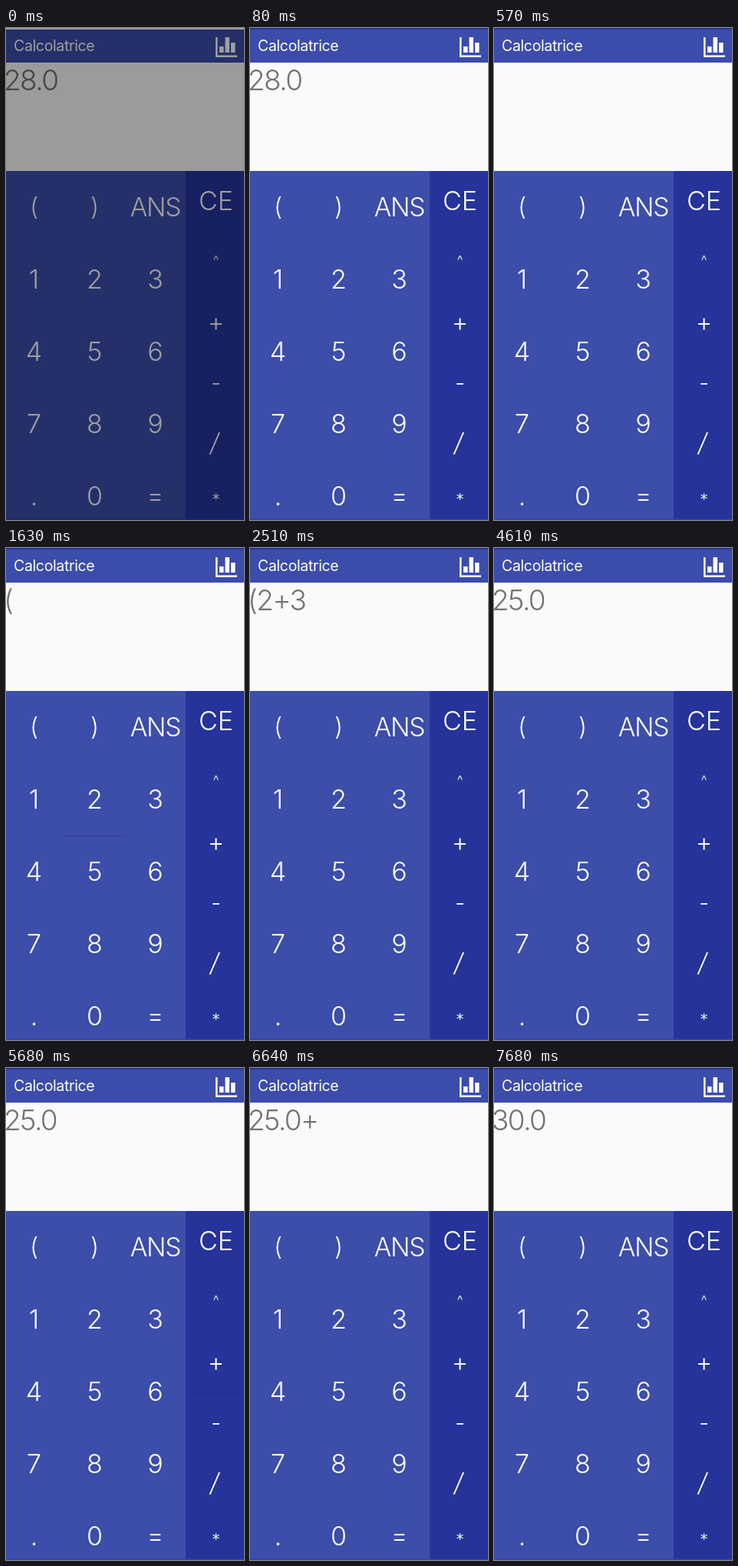
An HTML page that plays this animation: 310 px wide and 640 px high, repeating every 8.09 s.

```html
<!DOCTYPE html>
<html lang="it">
<head>
<meta charset="utf-8">
<title>Calcolatrice</title>
<style>
  html, body { margin: 0; width: 100%; height: 100%; overflow: hidden; }
  svg { display: block; width: 100%; height: 100%; }
  text { font-family: Inter, Roboto, sans-serif; font-weight: 300; white-space: pre; }
</style>
</head>
<body>
<svg id="stage" viewBox="0 0 310 640" xmlns="http://www.w3.org/2000/svg"></svg>
<script>
const LOOP = 8090;
const DIM_END = 80;
const ROW = 94, SIDE_ROW = 78.5, TOP = 186;
const svg = document.getElementById('stage');

function add(tag, attrs, content = '') {
  const el = document.createElementNS(svg.namespaceURI, tag);
  for (const name in attrs) el.setAttribute(name, attrs[name]);
  el.textContent = content;
  return svg.appendChild(el);
}
const rect = (x, y, width, height, fill) => add('rect', { x, y, width, height, fill });
const label = (str, x, y, size, extra) =>
  add('text', { x, y, 'font-size': size, fill: '#fff', ...extra }, str);
const centred = { 'text-anchor': 'middle' };

// Panels
rect(0, 0, 310, 640, '#fafafa');
rect(0, 0, 310, 45, '#3b4cab');
rect(0, 0, 310, 2, '#26349a');
rect(0, TOP, 234, 454, '#3c4daa');
rect(234, TOP, 76, 454, '#25339a');

// Header
label('Calcolatrice', 10, 30, 19.5, { 'letter-spacing': -0.35, style: 'font-weight: 400' });
for (const [x, y, w, h] of [[273, 12, 2.5, 26], [273, 35.5, 28, 2.5],
  [278, 24, 5.5, 8], [285.5, 12, 5.5, 20], [293, 19, 5.5, 13]]) rect(x, y, w, h, '#fff');

// Number pad
const columns = [36.5, 115.5, 194.5];
[...'123456789'].forEach((digit, i) =>
  label(digit, columns[i % 3], 339 + Math.floor(i / 3) * ROW, 34, centred));
label('0', columns[1], 621, 34, centred);
label('(', columns[0], 244, 32, centred);
label(')', columns[1], 244, 32, centred);
label('ANS', columns[2], 245, 33.5, { ...centred, 'letter-spacing': -1.3 });
label('.', columns[0], 621, 34, centred);
label('=', columns[2], 619.5, 33, centred);

// Operators
for (const [op, y, size] of [['CE', 237, 34], ['^', 309, 18], ['+', 393.5, 33],
  ['-', 471.5, 29], ['*', 621, 22]]) label(op, 273.5, y, size, centred);
label('/', 271.5, 551, 33, { ...centred, 'font-style': 'italic' });
rect(0, 638.5, 310, 1.5, '#34449f');

const display = label('', -3, 81, 37, { fill: '#737373', 'letter-spacing': -1.6 });
const edge = rect(0, 0, 0, 1, '#000');
const blur = rect(0, 0, 0, 2, '#000');
edge.setAttribute('opacity', 0.16);
blur.setAttribute('opacity', 0.07);
const dim = rect(0, 0, 310, 640, '#000');
dim.setAttribute('opacity', 0.38);
const dimTop = rect(0, 0, 310, 2, '#9b9b9b');

// Bottom edge of each key that gets pressed: x, y, width
const pad = (col, row) => [[0, 76, 155][col], TOP + row * ROW, [75, 79, 79][col]];
const side = row => [235, Math.floor(TOP + row * SIDE_ROW), 75];
const keys = {
  '(': pad(0, 1), ')': pad(1, 1), 2: pad(1, 2), 3: pad(2, 2), 5: pad(1, 3),
  CE: side(1), '^': side(2), '+': side(3)
};

// Time, display, pressed key, deep shadow
const steps = [
  [0, '28.0'],
  [490, '', 'CE', true], [570, ''],
  [1150, '', '('], [1390, '(', '(', true], [1470, '('],
  [1630, '(', '2'], [1870, '(2', '2', true], [1950, '(2'],
  [2190, '(2', '+'], [2270, '(2+', '+', true], [2350, '(2+', '3'],
  [2430, '(2+3', '3', true], [2510, '(2+3'],
  [2750, '(2+3', ')'], [2910, '(2+3)', ')', true], [2990, '(2+3)'],
  [3480, '(2+3)', '^'], [3800, '(2+3)^', '^', true],
  [3880, '(2+3)^', '2'], [3960, '(2+3)^2', '2', true], [4040, '(2+3)^2'],
  [4610, '25.0'],
  [5680, '25.0', '+'], [6160, '25.0+', '+'], [6640, '25.0+'],
  [6880, '25.0+', '5'], [6960, '25.0+5', '5', true], [7040, '25.0+5'],
  [7680, '30.0']
];

function place(el, [x, y, width], shown) {
  el.setAttribute('x', x);
  el.setAttribute('y', y);
  el.setAttribute('width', shown ? width : 0);
}

function draw(time) {
  const [, str, key, deep] = steps.findLast(step => step[0] <= time);
  display.textContent = str;
  const [x, y, w] = keys[key] || [0, 0, 0];
  place(edge, [x, y, w], key);
  place(blur, [x, y + 1, w], deep);
  const shade = time < DIM_END ? 'visible' : 'hidden';
  dim.setAttribute('visibility', shade);
  dimTop.setAttribute('visibility', shade);
}

const start = performance.now();
function tick() {
  draw((performance.now() - start) % LOOP);
  requestAnimationFrame(tick);
}
tick();
</script>
</body>
</html>
```
